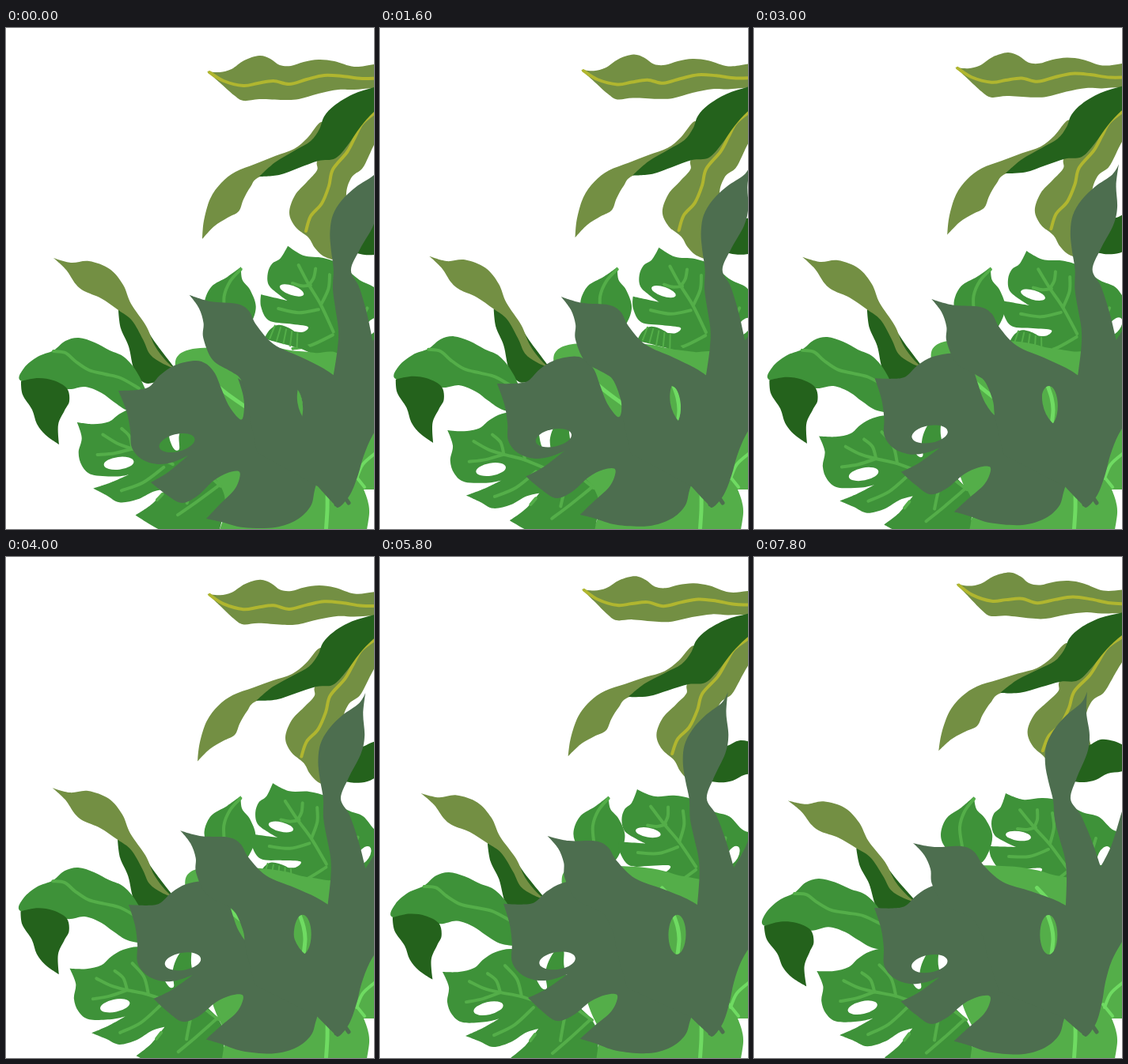
Recreate the animation shown at these times as an HTML page. Size 465 px wide and 634 px high, loop 8 s.

```html
<!DOCTYPE html>
<html lang="en">
<head>
<meta charset="utf-8">
<title>Leaves</title>
<style>
html, body { margin: 0; width: 100%; height: 100%; overflow: hidden; background: #fff; }
svg { display: block; width: 100vw; height: 100vh; }
</style>
</head>
<body>
<svg id="stage" viewBox="0 0 465 634" preserveAspectRatio="none"></svg>
<script>
(() => {
const NS = 'http://www.w3.org/2000/svg';
const stage = document.getElementById('stage');
const OLIVE = '#738f43', GOLD = '#b0b62f', DARK = '#24621c', MID = '#3e9239',
      LIGHT = '#54ae49', BRIGHT = '#6fdb62', SLATE = '#4d6e4f';
const LOOP = 8000, STEP = 200, RAD = Math.PI / 180;

function add(parent, tag, attrs = {}) {
  const el = document.createElementNS(NS, tag);
  for (const k in attrs) el.setAttribute(k, attrs[k]);
  return parent.appendChild(el);
}

// "x,y x,y! ..." where ! marks a sharp corner
function parse(text) {
  return text.trim().split(/\s+/).map(s => {
    const [x, y] = s.replace('!', '').split(',').map(Number);
    return { x, y, sharp: s.endsWith('!') };
  });
}

// Smooth curve through the points
function curve(text, closed) {
  const pts = parse(text), n = pts.length;
  const at = i => closed ? pts[(i + n) % n] : pts[Math.max(0, Math.min(n - 1, i))];
  const handle = (i, sign) => {
    const p = at(i), a = at(i - 1), b = at(i + 1);
    const k = p.sharp ? 0 : sign / 6;
    return `${p.x + (b.x - a.x) * k} ${p.y + (b.y - a.y) * k}`;
  };
  let d = `M${pts[0].x} ${pts[0].y}`;
  for (let i = 0; i < n - (closed ? 0 : 1); i++) {
    const q = at(i + 1);
    d += `C${handle(i, 1)} ${handle(i + 1, -1)} ${q.x} ${q.y}`;
  }
  return closed ? d + 'Z' : d;
}

function oval(cx, cy, rx, ry, tilt) {
  const dx = rx * Math.cos(tilt * RAD), dy = rx * Math.sin(tilt * RAD);
  const arc = `A${rx} ${ry} ${tilt} 0 1 `;
  return `M${cx - dx} ${cy - dy}${arc}${cx + dx} ${cy + dy}${arc}${cx - dx} ${cy - dy}Z`;
}

const fill = (g, color, outline, holes = '') =>
  add(g, 'path', { d: curve(outline, true) + holes, fill: color, 'fill-rule': 'evenodd' });
const vein = (g, color, width, ...lines) => lines.forEach(l =>
  add(g, 'path', { d: curve(l), fill: 'none', stroke: color,
    'stroke-width': width, 'stroke-linecap': 'round' }));

// Each leaf sways about a pivot: amp in degrees, rate in degrees per second
const sway = (x, y, amp, rate, phase, rest = 0) => ({ x, y, amp, rate, phase, rest });
const movers = [];
function moving(motion, el = add(stage, 'g')) {
  movers.push({ el, ...motion });
  return el;
}

// Hanging leaves, top right
const crown = moving(sway(525, 66, 2.81, 15, 8));
fill(crown, OLIVE, `254,55! 270,56 285,52 301,41 320,35 334,39 346,47 360,48 376,43 395,40 415,42 440,49
  465,46 500,40! 500,74! 465,76 440,78 420,78 395,83 370,90 350,91 320,90 300,92 288,85 270,69`);
vein(crown, GOLD, 4, '257,56 275,67 300,73 318,70 338,67 358,71 380,65 402,60 425,61 450,64 480,63');
fill(crown, OLIVE, `396,164 393,180 380,195 365,212 358,234 366,252 382,265 390,278 400,288 412,293! 440,260
  430,215 436,190 450,178 458,163 465,148 485,110! 465,103 436,130`);
vein(crown, GOLD, 4, '476,100 465,108 450,121 441,138 431,157 413,179 408,200 399,222 385,238 379,257');
fill(crown, OLIVE, `248,267! 250,244 258,216 272,196 290,182 315,172 340,162 364,153 381,139 398,119 410,130!
  370,170 321,188 309,201 300,217 294,232 280,240 263,251`);
fill(crown, DARK, `490,68! 465,75 438,84 415,98 402,112 396,128 385,143 365,155 340,170 320,188! 345,186
  370,177 395,168 416,165 432,148 448,125 465,106 490,85!`);

// Curled leaves, left
const curl = moving(sway(300, 545, -3.44, 18, -32));
fill(curl, DARK, '142,357! 145,380 155,403 162,433 175,449 193,446 213,430! 190,400 165,365');
fill(curl, OLIVE, `60,291! 82,297 105,295 131,305 148,325 158,349 177,377 188,402 202,421 213,431!
  197,424 182,413 173,394 159,370 142,357 120,342 99,333 88,324 76,306`);
fill(curl, MID, `18,446 23,430 40,416 60,408 75,396 92,392 112,398 131,408 150,417 168,440 190,490!
  156,485 136,473 121,462 100,454 78,457 50,450`);
fill(curl, DARK, '19,447! 40,443 60,446 77,456 80,472 74,484 66,502 67,527! 50,515 39,501 33,483 21,464');
vein(curl, LIGHT, 4, '60,409 75,411 88,422 105,433 125,438 145,443 168,456');

// Small pointed leaf
const bud = moving(sway(295, 520, -4.6, 18, -35, 5));
fill(bud, MID, '278,303! 262,317 243,331 236,352 243,369 262,382 285,388 297,372 301,351 292,331 281,319');
vein(bud, LIGHT, 4, '278,306 266,322 260,342 263,366');

// Split leaf behind the stem
const fan = moving(sway(452, 477, -5.78, 22, 0, 11.5));
fill(fan, MID, `318,299! 340,307 365,305 388,309 415,323 436,329 455,346 480,350! 470,400 440,440 390,430
  326,415! 340,405 358,402 363,394 340,395 313,396 300,381 297,366! 331,367! 318,361 304,352 300,338
  303,325 312,316`,
  oval(334, 353, 16, 6, 8) + oval(442, 378, 7, 13, 27));
vein(fan, LIGHT, 4, '336,320 354,342 374,364 396,394', '358,320 358,332 354,342',
  '377,324 379,342 374,363', '333,344 345,345 356,342', '322,379 348,379 372,370',
  '432,356 427,372 420,390', '350,425 372,416 396,398');
fill(fan, MID, '312,420! 317,407 327,399 345,402 362,413 378,424!');
for (let i = 0; i < 5; i++)
  vein(fan, LIGHT, 2, `${322 + i * 7.5},${401 + i} ${319 + i * 9},${418 + i * 1.5}`);

// Broad light leaf
const broad = moving(sway(430, 600, 5.3, 12, 90));
fill(broad, LIGHT, `214,429 218,414 236,406 268,404 310,402 340,404 360,408 390,411 425,418 440,500
  425,600! 300,640! 265,590 240,520 222,460`);
vein(broad, BRIGHT, 5, '255,443 278,462 302,479', '341,426 358,441');

const base = add(stage, 'g');
fill(base, LIGHT, '430,470 470,455! 475,584! 452,584! 457,598 459,614 455,640! 268,640! 290,580! 390,570!');
vein(base, BRIGHT, 5, '406,585 406,610 404,640');
vein(base, BRIGHT, 4, '441,566 453,581', '443,570 451,552 468,537');
vein(base, SLATE, 5, '416,588 417,603', '424,588 433,601');

// Split leaf, lower left
const low = moving(sway(329, 613, -6.2, 14, 90, 6.1));
fill(low, MID, `79,525! 100,525 119,520 131,509 146,500 166,496 183,503 193,518 198,535 205,546 211,545 209,528
  213,512 222,498 232,498 233,520 245,560 268,586 276,610 270,655! 215,655 165,634! 184,618 200,597!
  184,602 165,614 143,620 126,613 108,606! 130,596 151,584! 135,588 105,589 91,579 85,563 87,544`,
  oval(137, 571, 19, 8, -13));
vein(low, LIGHT, 4, '113,537 132,546 152,551 178,556 205,565', '109,563 130,559 152,551', '136,527 147,536 152,551',
  '158,517 173,534 179,556', '144,605 170,592 194,570', '190,612 196,604', '218,628 240,609 265,586',
  '233,584 230,600 228,612', '246,570 268,586');

// Large slate leaf: a side lobe and the stem with its upper lobe
const lobeSway = sway(385, 612, 3.9, 20, 74);
const stemSway = sway(418, 606, -7.21, 10, 10, 6.85);
const lobe = moving(lobeSway);
fill(lobe, SLATE, `142,459! 165,458 181,454 195,439 213,427 238,421 253,425 264,437 272,456 281,477 293,493
  299,494 301,478 299,462 293,443! 325,465! 365,520! 397,560! 390,585 385,605 368,622 340,632 300,632
  272,625 253,621! 270,603 288,585 295,570 294,561 280,563 262,573 242,592 222,601 202,590 183,575!
  205,562 230,541! 212,549 192,552 172,546 159,531 157,508 152,484`,
  oval(216, 525, 23, 11, -14));

const stem = moving(stemSway);
fill(stem, DARK, '415,240 424,238 438,231 455,233 472,241! 490,262! 466,271 447,274 432,282 417,285 403,284!');
fill(stem, SLATE, `421,170! 414,184 394,201 378,220 369,240 368,262 372,284 378,308 380,332 386,356 393,382
  395,406 394,441! 378,433 350,423 314,411 290,390 278,373 262,366 228,367 201,362! 215,377 223,395 225,414
  240,440 265,452 278,460 290,483 295,505 310,550! 391,583! 413,602 421,606 433,588 440,562 444,538
  452,511 465,487 482,460 530,420! 530,250! 478,285 465,322 452,364 438,392! 430,368 422,347 412,325
  400,306 408,279 421,248 424,225 420,197`);

// The light leaf shows where the openings of both lobes overlap
function opening(parent, id, motion, d) {
  moving(motion, add(add(stage, 'clipPath', { id }), 'path', { d }));
  return add(parent, 'g', { 'clip-path': `url(#${id})` });
}
const outer = opening(stage, 'lobe-gap', lobeSway, oval(364, 479, 11, 25, -4));
const gap = opening(outer, 'stem-gap', stemSway, oval(378, 474, 26, 36, -15));
add(gap, 'rect', { x: 340, y: 440, width: 60, height: 75, fill: LIGHT });
vein(gap, BRIGHT, 5, '370,450 376,468 378,484 375,510');

function render(t) {
  for (const m of movers) {
    const turn = m.amp * (Math.cos(m.phase * RAD) - Math.cos((m.phase + m.rate * t / 1000) * RAD));
    m.el.setAttribute('transform', `rotate(${m.rest + turn} ${m.x} ${m.y})`);
  }
}

function tick() {
  const t = performance.now() % LOOP;
  render(Math.floor(t / STEP) * STEP);
  requestAnimationFrame(tick);
}
tick();
})();
</script>
</body>
</html>
```
